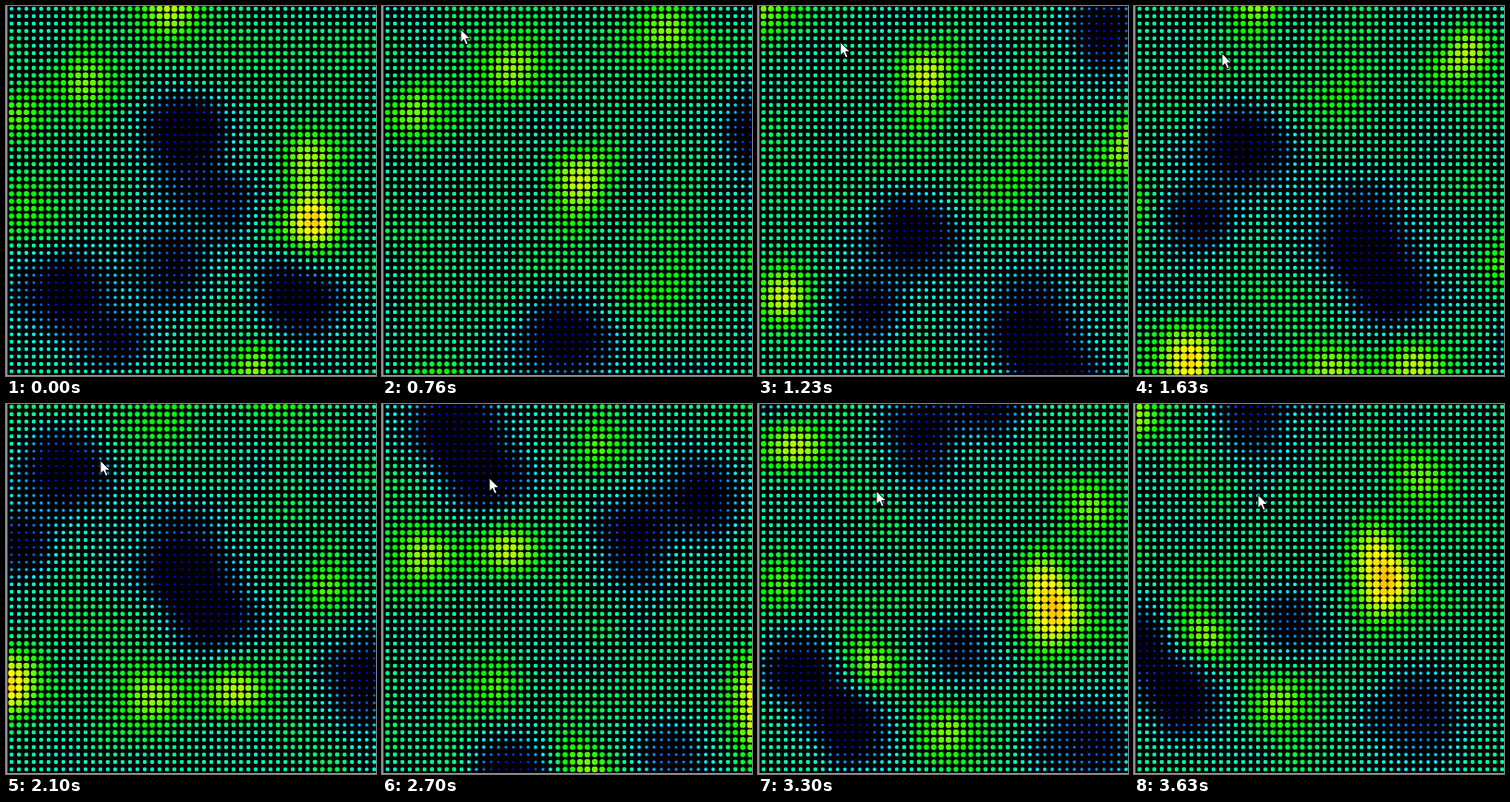
An HTML page with a canvas that plays this animation: 400x400 px, repeating every 8000 ms.

```html
<!DOCTYPE html>
<html>
<head>
<meta charset="utf-8">
<style>
  html, body { margin: 0; width: 100%; height: 100%; overflow: hidden; background: #000; }
  canvas { display: block; }
</style>
</head>
<body>
<canvas id="stage" width="400" height="400"></canvas>
<script>
const ctx = document.getElementById('stage').getContext('2d');
const LOOP = 8000, START = 500, STEP = 200 / 3, CELLS = 50, PITCH = 8;
const LEVEL = .45, GRAIN = .09, HILL = 4.5, HOLLOW = 5.5;

// Main hills and hollows in cells: x, y, height. Seeded noise fills in the rest.
const restLand = [
  [41,29,.45], [40,20,.3], [10,10,.25], [22,0,.32], [33,49,.38], [1,14,.25], [3,26,.2],
  [24,17,-.5], [22,35,-.42], [7,38,-.5], [39,39,-.5], [14,45,-.3], [28,26,-.22]
];
const panLand = [
  [26,24,.45], [17,8,.3], [4,14,.32], [7,53,.42], [17,74,.5], [54,33,.35], [36,75,.32],
  [47,74,.35], [59,61,.22], [46,93,.25], [57,104,.35], [83,98,.43], [81,92,.35],
  [88,83,.28], [68,113,.32], [38,2,.3], [36,38,.2],
  [24,44,-.5], [17,54,-.4], [40,57,-.5], [44,64,-.45], [50,17,-.4], [64,74,-.4],
  [73,67,-.42], [48,105,-.4], [54,112,-.45], [69,102,-.28], [86,114,-.35]
];

// Pointer path: step, x, y. The pan follows it, one cell per pixel.
const path = [[4,85,25], [11,89,39], [17,95,51], [24,102,61], [38,124,90], [47,134,98]];

const mix = (a, b, u) => a + (b - a) * u;
const ease = u => u * u * (3 - 2 * u);

function random(x, y) {
  const s = Math.sin(x * 127.1 + y * 311.7) * 43758.5453;
  return (s - Math.floor(s)) * 2 - 1;
}

function noise(x, y) {
  const i = Math.floor(x), j = Math.floor(y), u = ease(x - i), v = ease(y - j);
  return mix(mix(random(i, j), random(i + 1, j), u),
             mix(random(i, j + 1), random(i + 1, j + 1), u), v);
}

function height(land, x, y) {
  let h = LEVEL + GRAIN * noise(x / 5, y / 5);
  for (const [cx, cy, rise] of land) {
    const radius = rise > 0 ? HILL : HOLLOW;
    h += rise * Math.exp(-((x - cx) ** 2 + (y - cy) ** 2) / radius ** 2);
  }
  return Math.max(.04, Math.min(1, h));
}

// Steps shown, including the pauses in the motion.
function stepAt(t) {
  let k = Math.floor((t - START + 6) / STEP);
  if (k > 24 && k < 33) k = 24;
  if (k > 43) k -= (k + 1) % 2;
  return Math.max(-1, Math.min(47, k));
}

function pointerAt(k) {
  let n = 1;
  while (k > path[n][0]) n++;
  const a = path[n - 1], b = path[n], u = (k - a[0]) / (b[0] - a[0]);
  return [1, 2].map(c => Math.round(mix(a[c], b[c], u)));
}

function drawDots(land, ox, oy) {
  for (let j = 0; j < CELLS; j++) {
    for (let i = 0; i < CELLS; i++) {
      const h = height(land, i + ox, j + oy);
      ctx.fillStyle = `hsl(${250 - 210 * h}, 100%, 50%)`;
      ctx.beginPath();
      ctx.arc(6 + i * PITCH, 3 + j * PITCH, 1 + 3 * h, 0, 7);
      ctx.fill();
    }
  }
}

const arrow = new Path2D('M0 0V14.5L3.3 11.4L5.8 17L8.2 16L5.8 10.5H10.4Z');

function drawPointer(x, y) {
  ctx.save();
  ctx.translate(x, y);
  ctx.fillStyle = '#fff';
  ctx.strokeStyle = '#000';
  ctx.fill(arrow);
  ctx.stroke(arrow);
  ctx.restore();
}

function draw(k) {
  ctx.fillStyle = '#000';
  ctx.fillRect(0, 0, 400, 400);
  if (k < 0) {
    drawDots(restLand, 0, 0);
  } else {
    const [x, y] = pointerAt(k);
    drawDots(panLand, x - path[0][1], y - path[0][2]);
    drawPointer(x, y);
  }
  ctx.fillStyle = '#999';
  ctx.fillRect(0, 0, 1.5, 400);
  ctx.fillRect(0, 399, 400, 1);
}

let shown;
const begin = performance.now();
function tick() {
  const k = stepAt((performance.now() - begin) % LOOP);
  if (k !== shown) draw(shown = k);
  requestAnimationFrame(tick);
}
tick();
</script>
</body>
</html>
```
